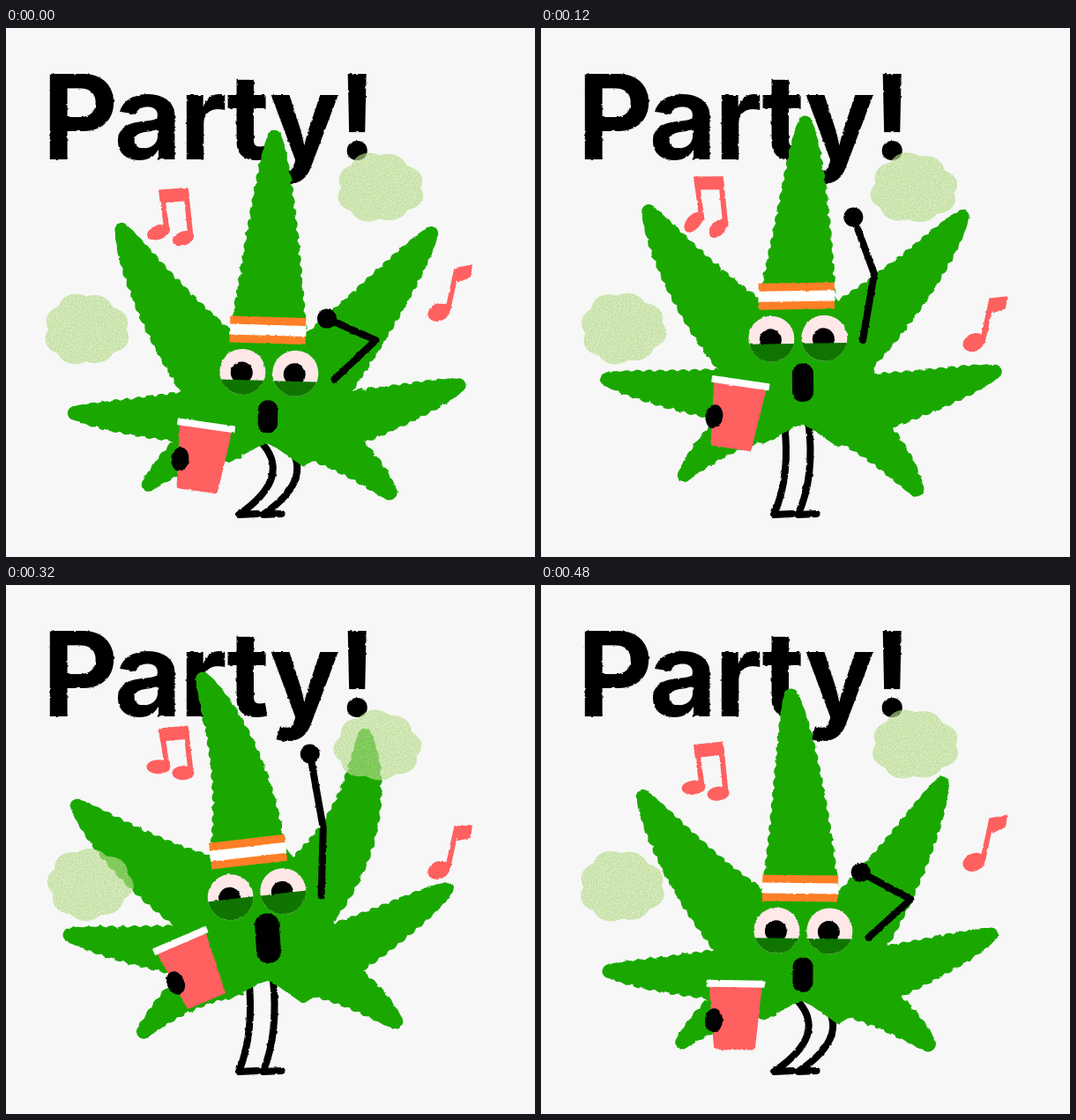
Animation of 600 by 600 pixels, one loop 0.52 s. Source, as an HTML page:

```html
<!DOCTYPE html>
<html lang="en">
<head>
<meta charset="utf-8">
<title>Party!</title>
<style>
html, body { margin: 0; width: 100%; height: 100%; overflow: hidden; background: #f7f7f7; }
svg { display: block; width: 100vw; height: 100vh; }
text { font: 700 133px Inter, sans-serif; letter-spacing: -.023em; }
.line { fill: none; stroke: #000; stroke-width: 8; stroke-linecap: round; stroke-linejoin: round; }
.leaf { fill: #1aa800; }
.coral { fill: #ff6060; }
.stem { fill: none; stroke: #ff6060; stroke-width: 6; stroke-linejoin: round; }
.orange { fill: #ff7f27; }
.white { fill: #fff; }
.eye { fill: #ffe8e8; }
.lid { fill: #0f7500; }
.smoke { fill: #a9d57a; opacity: .65; }
</style>
</head>
<body>
<svg viewBox="0 0 600 600">
  <defs>
    <filter id="rough" filterUnits="userSpaceOnUse" x="0" y="0" width="600" height="600" color-interpolation-filters="sRGB">
      <feTurbulence type="fractalNoise" baseFrequency=".2" numOctaves="2" seed="4"/>
      <feDisplacementMap in="SourceGraphic" scale="2.5" xChannelSelector="R" yChannelSelector="G"/>
    </filter>
    <filter id="grain" filterUnits="userSpaceOnUse" x="0" y="0" width="600" height="600" color-interpolation-filters="sRGB">
      <feTurbulence type="fractalNoise" baseFrequency=".7" numOctaves="2" seed="9"/>
      <feColorMatrix values="0 0 0 0 .84  0 0 0 0 .93  0 0 0 0 .7  3 0 0 0 -1.2"/>
      <feComposite in2="SourceGraphic" operator="in" result="specks"/>
      <feMerge><feMergeNode in="SourceGraphic"/><feMergeNode in="specks"/></feMerge>
    </filter>
  </defs>
  <g filter="url(#rough)"><text x="41" y="149">Party!</text></g>
  <g filter="url(#rough)">
    <path id="beam" class="coral"/>
    <path id="stems" class="stem"/>
    <ellipse id="headA" class="coral" rx="13.5" ry="8"/>
    <ellipse id="headB" class="coral" rx="12.5" ry="8"/>
    <path id="flag" class="coral"/>
    <path id="stemC" class="stem"/>
    <ellipse id="headC" class="coral" rx="13" ry="10"/>
    <path id="legs" class="line"/>
    <path id="leaf" class="leaf"/>
    <g id="band">
      <rect class="orange" x="-43" y="-15" width="86" height="30"/>
      <rect class="white" x="-43.5" y="-6" width="87" height="12"/>
    </g>
    <g id="face">
      <g transform="translate(-30)"><circle class="eye" r="26"/><circle cx="-1" cy="1" r="12.5"/><path class="lid"/></g>
      <g transform="translate(30)"><circle class="eye" r="26"/><circle cx="-1" cy="1" r="12.5"/><path class="lid"/></g>
    </g>
    <rect id="mouth"/>
    <path id="arm" class="line"/>
    <circle id="fist" r="11"/>
    <g id="cup">
      <path class="coral" d="M-30-33H30L23.500 36Q23 39 20 39H-20Q-23 39-23.500 36Z"/>
      <rect class="white" x="-33" y="-40" width="66" height="8" rx="1"/>
      <ellipse cx="-24" cy="6" rx="10" ry="13.500"/>
    </g>
  </g>
  <g class="smoke" filter="url(#grain)"><path id="puffA"/></g>
  <g class="smoke" filter="url(#grain)"><path id="puffB"/></g>
</svg>
<script>
const LOOP = 520, STEP = 40;
const $ = id => document.getElementById(id);
const set = (el, attrs) => { for (const k in attrs) el.setAttribute(k, attrs[k]); };
const draw = (id, d) => $(id).setAttribute('d', d);
const place = (id, [x, y], a = 0) => $(id).setAttribute('transform', `translate(${x} ${y}) rotate(${a})`);
const add = ([x, y], dx, dy) => [x + dx, y + dy];
const poly = pts => 'M' + pts.map(p => p.map(v => v.toFixed(1)).join(' ')).join('L');

// Periodic motion: a mean, one swing per loop, and an optional double-speed accent.
let angle = 0;
const wave = (mean, c, s = 0, c2 = 0, s2 = 0) => mean
  + c * Math.cos(angle) + s * Math.sin(angle)
  + c2 * Math.cos(2 * angle) + s2 * Math.sin(2 * angle);

// Scalloped blade along a bent spine, tapering to a round tip.
function blade(root, tip, bend, spread, power, r = 8) {
  const dx = tip[0] - root[0], dy = tip[1] - root[1], len = Math.hypot(dx, dy);
  const ctrl = [0, 1].map(k => (root[k] + tip[k]) / 2 + 2 * bend * [-dy, dx][k] / len);
  const n = Math.ceil(len / 2.5), left = [], right = [];
  for (let i = 0; i <= n; i++) {
    const t = i / n, q = 1 - t;
    const [x, y] = [0, 1].map(k => q * q * root[k] + 2 * q * t * ctrl[k] + t * t * tip[k]);
    const [vx, vy] = [0, 1].map(k => q * (ctrl[k] - root[k]) + t * (tip[k] - ctrl[k]));
    const bump = Math.min(1, q * 5) * (2.8 * Math.abs(Math.sin(Math.PI * q * len / 13)) - 1);
    const w = (r + spread * q ** power + bump) / Math.hypot(vx, vy);
    left.push([x + vy * w, y - vx * w]);
    right.unshift([x - vy * w, y + vx * w]);
  }
  return `${poly(left)}A${r} ${r} 0 0 1 ${right[0].join(' ')}${poly(right).replace('M', 'L')}Z`;
}

// Ellipse with eight soft lobes.
function cloud([cx, cy], turn, rx, ry) {
  const pts = [];
  for (let i = 0; i < 120; i++) {
    const a = i * Math.PI / 60, s = a + turn * Math.PI / 180;
    const k = .9 + .1 * Math.abs(Math.sin(4 * s)) + .03 * Math.sin(3 * s + 1);
    pts.push([cx + rx * k * Math.cos(a), cy + ry * k * Math.sin(a)]);
  }
  return poly(pts) + 'Z';
}

function drawLeaf(eyes, band, tilt, crotch) {
  const a = tilt * Math.PI / 180, c = 43 * Math.cos(a), s = 43 * Math.sin(a);
  // Clockwise like the blades, so that overlaps stay filled.
  const core = poly([
    add(band, -c, -s), add(band, c, s), add(eyes, 86, 20), add(crotch, 82, 0),
    add(crotch, 40, 26), add(crotch, 10, 5), crotch, add(crotch, -10, 3),
    add(crotch, -45, 22), add(crotch, -80, 0), add(eyes, -88, 16)
  ]) + 'Z';
  const top = [wave(266, 38.6, 28, 0, 4.3), wave(111.3, 12.4, -5.8)];
  const upL = [wave(104.5, 23.6, 16.6, 3, 4.3), wave(231.8, -3.4, -23.9)];
  const upR = [wave(444.7, 31.9, 33.3, 5.7, 7.4), wave(200.8, 32.3, 9.1)];
  const midL = [wave(74.5, 3.3), eyes[1] + 46];
  const midR = [wave(508, 6, 6), wave(375, 30.2, 11.2)];
  const lowL = [wave(159.5, 2, 3), wave(510, 8, -4)];
  const lowR = [wave(435, 0, -9.6), wave(512, 14.8, 9)];
  draw('leaf', [
    core,
    blade(add(band, 0, 16), top, wave(7, -6, -4), 36, .75),
    blade(add(eyes, -53, 6), upL, -8, 40, .78),
    blade(add(eyes, 55, 2), upR, wave(11.5, -9, -4.5), 35, .75),
    blade(add(crotch, -58, -32), midL, -3, 25, .8),
    blade(add(crotch, 55, -20), midR, 3, 28, .75),
    blade(add(crotch, -40, -15), lowL, 7, 24, 1),
    blade(add(crotch, 35, -20), lowR, -7, 24, .8, 9)
  ].join(''));
}

function drawFace(eyes, tilt) {
  place('face', eyes, tilt);
  const d = wave(5.2, 4), x = Math.sqrt(26 * 26 - d * d);
  document.querySelectorAll('.lid').forEach(el => set(el, { d: `M${-x} ${d}A26 26 0 0 0 ${x} ${d}Z` }));
  const h = wave(47, -10, -2.5), w = 12 + .28 * h;
  set($('mouth'), { x: -w / 2, y: -h / 2, width: w, height: h, rx: w * .46 });
  place('mouth', [297, eyes[1] + 50], tilt * .6);
}

function drawLimbs(dip, hipY) {
  const hip = 272 + .3 * dip, knee = 269 + .64 * dip;
  const leg = dx => {
    const foot = 264 + dx, x = 2 * (knee + dx) - (hip + dx + foot) / 2;
    return `M${hip + dx} ${hipY - 4}Q${x} 508 ${foot} 552L${foot + 21} 551`;
  };
  draw('legs', leg(0) + leg(27.5));
  const fist = [wave(353, 11), wave(238.7, 75.2, -17.2, 15.7, -4.3)];
  const elbow = [wave(382, 37.4, -8.7), 255 + 1.95 * dip];
  const shoulder = [wave(364, 8.5), 340 + 1.15 * dip];
  draw('arm', poly([fist, elbow, shoulder]));
  place('fist', fist);
  place('cup', [wave(217.5, 4.5, 3), 423 + 1.25 * dip], wave(-5.3, 13.4, 12.2));
}

function drawNotes() {
  const l = wave(170, 10.5, 0, 3), r = wave(168, 10, 2, 3), turn = wave(-20, 0, -30);
  const a = [173, wave(217.5, 14.2, 1)], b = add(a, 28, 7);
  draw('beam', poly([[173, l], [206.5, r], [208, r + 15], [175, l + 15]]) + 'Z');
  draw('stems', poly([[176.5, l + 3], add(a, 9.5, -2)]) + poly([[204, r + 3], add(b, 8.5, -2)]));
  place('headA', a, turn);
  place('headB', b, turn);

  const c = [491, wave(331, -1, 17.4, -7.7, 4)];
  const top = add(c, 20, -50), flag = add(c, 38, wave(-52, -2));
  draw('flag', poly([add(top, -3, 0), flag, add(flag, -2, 14), add(top, 1, 17)]) + 'Z');
  draw('stemC', poly([add(top, 0, 2), add(c, 10, -2)]));
  place('headC', c, -25);
}

function frame() {
  const step = Math.floor(performance.now() % LOOP / STEP);
  angle = 2 * Math.PI * step * STEP / LOOP;
  const eyes = [wave(290.4, 7.9), wave(363, 24.1, -9.9, 3.7, -1.3)];
  const tilt = wave(-2.6, 4.3, 1.2), dip = eyes[1] - 340;
  const band = [292.3 + 2.7 * tilt, eyes[1] - 48];
  const crotch = [297, 443 + .56 * dip];
  drawLeaf(eyes, band, tilt, crotch);
  place('band', band, tilt);
  drawFace(eyes, tilt);
  drawLimbs(dip, crotch[1]);
  drawNotes();
  const turn = wave(10, -10);
  draw('puffA', cloud([wave(93, -2), wave(340.5, 1.5)], turn, 49, 41));
  draw('puffB', cloud([wave(422.5, 1.5), wave(182, -1)], -turn, 50, 40));
  requestAnimationFrame(frame);
}
frame();
</script>
</body>
</html>
```
